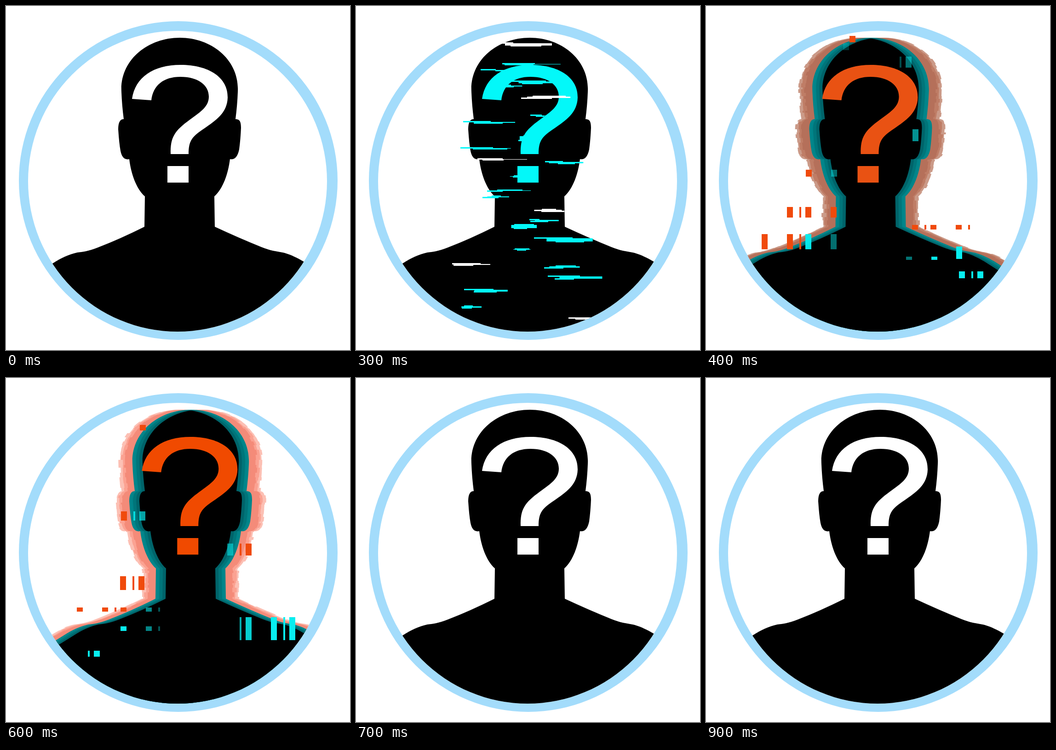
An HTML page with a canvas for the animation above (1 s loop, 748 by 748 pixels).

```html
<!DOCTYPE html>
<html lang="en">
<head>
<meta charset="utf-8">
<title>Unknown person glitch</title>
<style>
  html, body { margin: 0; width: 100%; height: 100%; overflow: hidden; background: #fff; }
  canvas { display: block; width: 100%; height: 100%; }
</style>
</head>
<body>
<canvas id="stage" width="748" height="748"></canvas>
<script>
const ctx = document.getElementById('stage').getContext('2d');
const CYAN = '#03f8f9', ORANGE = '#f04a0c';

const person = new Path2D(`M378 69C308 69 247 118 251 187Q252 215 256 246C248 246 244 253 244 268
  Q246 299 249 315Q253 336 268 333C272 365 283 397 302 414L301 480Q247 507 200 525C180 533 165 535 155 536
  C137 540 119 548 101 560L-60 660V800H810V660L646 555C634 548 620 541 606 537C590 533 580 534 555 524
  Q508 505 454 480L453 414C472 397 483 365 487 333Q502 336 507 312Q510 290 511 265C511 251 508 246 499 246
  Q503 215 504 187C508 118 448 69 378 69Z`);
const mark = new Path2D(`M274 202C281 155 320 128 380 128C440 128 483 155 482 199C481 233 456 249 430 267
  C405 284 397 292 397 322H358C357 285 367 271 400 247C425 229 441 218 441 197C441 172 418 154 379 154
  C343 154 320 172 316 205ZM351 348H397V384H351Z`);
const rim = new Path2D();
rim.arc(374.5, 379.5, 346.5, 0, 2 * Math.PI);
const inner = new Path2D();
inner.ellipse(373, 381, 325, 327, 0, 0, 2 * Math.PI);

function random(seed) {
  return () => {
    seed = (seed * 16807) % 2147483647;
    return seed / 2147483647;
  };
}

function fill(path, color, dx = 0) {
  ctx.save();
  ctx.translate(dx, 0);
  ctx.fillStyle = color;
  ctx.fill(path);
  ctx.restore();
}

function clean(tint = '#fff') {
  fill(person, '#000');
  fill(mark, tint);
}

// A torn bar: a solid middle with thin strips sliding off its edges.
function tear(color, x, y, w, h, rnd) {
  ctx.fillStyle = color;
  ctx.fillRect(x, y, w, h);
  for (const edge of [y - 2, y + h - 1]) {
    ctx.fillRect(Math.round(x + (rnd() - 0.5) * w * 0.6), edge, Math.round(w * (0.4 + rnd() * 0.5)), 3);
  }
}

function tears(color, seed, bars) {
  const rnd = random(seed);
  for (const bar of bars) tear(color, ...bar, rnd);
}

function strongTears() {
  clean(CYAN);
  tears('#fff', 7, [[302, 421, 64, 13], [245, 502, 70, 9], [418, 335, 68, 3]]);
  tears(CYAN, 19, [
    [262, 135, 80, 8], [402, 206, 103, 13], [246, 257, 109, 12], [175, 271, 106, 11], [255, 309, 150, 5],
    [397, 362, 110, 4], [222, 410, 70, 8], [350, 425, 88, 6], [205, 569, 170, 3],
    [293, 600, 80, 10], [365, 596, 107, 24], [520, 604, 88, 8], [321, 667, 60, 13], [410, 667, 118, 26], [250, 685, 150, 4]
  ]);
}

function looseTears(seed, count) {
  const rnd = random(seed);
  clean(CYAN);
  for (let i = 0; i < count; i++) {
    const y = Math.round(80 + 600 * (i + rnd()) / count), spread = y > 520 ? 150 : 90;
    const w = 25 + rnd() * 85, h = Math.ceil(rnd() * rnd() * 14);
    tear(i % 5 ? CYAN : '#fff', 378 - w / 2 + (rnd() * 2 - 1) * spread, y, w, h, rnd);
  }
}

// The part shared by the figure moved left and right by d.
function core(dx, d, color) {
  ctx.save();
  ctx.translate(dx - d, 0);
  ctx.clip(person);
  ctx.translate(2 * d, 0);
  ctx.fillStyle = color;
  ctx.fill(person);
  ctx.restore();
}

function fringe(dx, colors, seed) {
  const rnd = random(seed);
  for (let y = 66; y < 600;) {
    const h = 4 + Math.floor(rnd() * 8);
    ctx.save();
    ctx.beginPath();
    ctx.rect(0, y, 748, h);
    ctx.clip();
    colors.forEach((color, i) => {
      const reach = 26 - 6 * i;
      fill(person, color, dx - reach - 5 * rnd());
      fill(person, color, dx + reach + 5 * rnd());
    });
    ctx.restore();
    y += h;
  }
}

// Blocks at a repeating rhythm: orange off the figure, cyan on it, fading towards its middle.
function row(dx, x, y, h, count, phase) {
  for (let i = phase; i < phase + count; i++) {
    const w = [13, 13, 4][i % 3];
    const onFigure = ctx.isPointInPath(person, x + w / 2 - dx, y + h / 2);
    const depth = (Math.abs(x + w / 2 - 378 - dx) - 30) / 110;
    ctx.globalAlpha = onFigure ? Math.max(0, Math.min(1, depth)) : 1;
    ctx.fillStyle = onFigure ? '#08eef0' : ORANGE;
    ctx.fillRect(x, y, w, h);
    x += [55, 27, 13][i % 3];
  }
  ctx.globalAlpha = 1;
}

function split({ dx, markDx, colors, tint, seed, rows }) {
  fringe(dx, colors, seed);
  fill(person, '#00858a', dx);
  core(dx, 8, '#00757a');
  core(dx, 15, '#00646a');
  core(dx, 22, '#000');
  for (const r of rows) row(dx, ...r);
  fill(mark, tint, markDx);
}

// Rows are x, y, height, block count, place in the rhythm.
const left = {
  dx: -19.5, markDx: -21.5, seed: 71, tint: '#e95213',
  colors: ['#cb9a88', '#bf7d66', '#b5705a'],
  rows: [
    [121, 496, 33, 5, 0], [176, 437, 23, 4, 1], [448, 476, 10, 5, 1], [217, 356, 15, 2, 0], [421, 110, 24, 2, 2],
    [298, 81, 15, 1, 0], [312, 65, 14, 1, 0], [449, 268, 26, 1, 0], [435, 545, 7, 2, 0], [544, 523, 27, 1, 0], [550, 577, 15, 3, 1]
  ]
};
const right = {
  dx: 24, markDx: 21.3, seed: 137, tint: '#f04a00',
  colors: ['#fcc0b4', '#fba292', '#f48b79'],
  rows: [
    [154, 499, 9, 6, 0], [508, 520, 50, 5, 2], [248, 431, 30, 3, 1], [291, 102, 12, 1, 0],
    [250, 290, 20, 3, 1], [481, 360, 26, 3, 1], [249, 540, 10, 3, 0], [178, 593, 13, 2, 2]
  ]
};
const middle = {
  dx: 1, markDx: 0, seed: 29, tint: '#ed4e0a',
  colors: ['#f0b3a4', '#df8f7b', '#d57c66'],
  rows: [[148, 497, 22, 4, 0], [196, 440, 20, 4, 1], [520, 540, 20, 3, 0]]
};

// One scene per 100 ms.
const scenes = [
  () => clean(), () => clean(), strongTears, () => looseTears(4211, 26), () => split(left),
  () => split(middle), () => split(right), () => clean(), () => looseTears(9173, 18), () => clean()
];
let shown = -1;

function tick() {
  const step = Math.floor(performance.now() % 1000 / 100);
  if (step !== shown) {
    shown = step;
    ctx.clearRect(0, 0, 748, 748);
    fill(rim, '#a3dcfb');
    fill(inner, '#fff');
    ctx.save();
    ctx.clip(inner);
    scenes[step]();
    ctx.restore();
  }
  requestAnimationFrame(tick);
}
tick();
</script>
</body>
</html>
```
